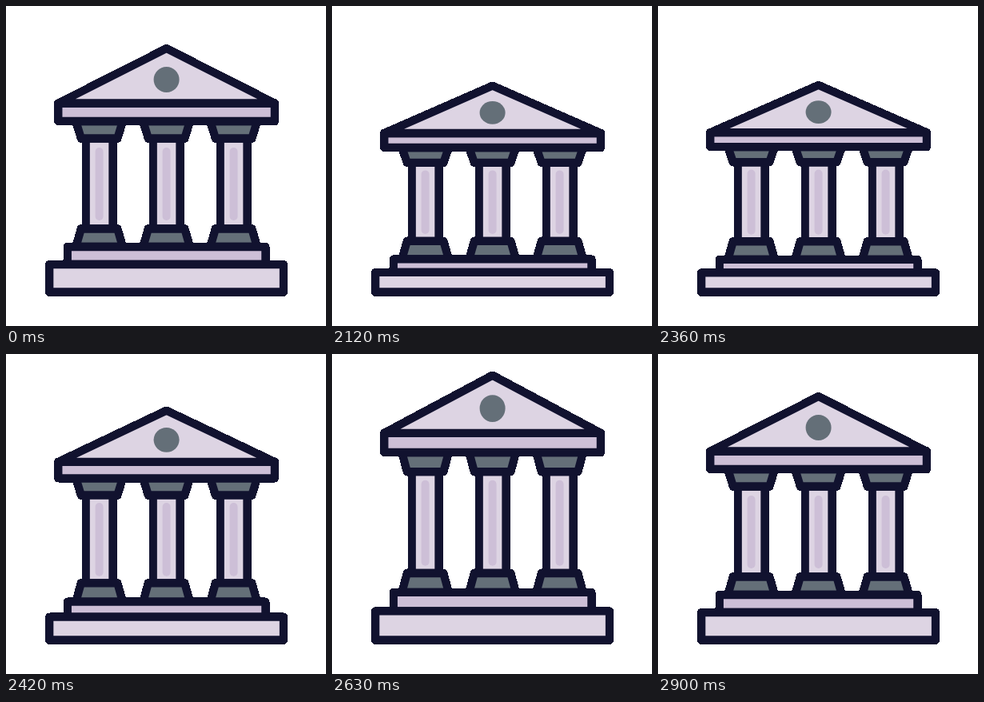
An HTML page with a canvas that plays this animation: 400x400 px, repeating every 2.93 s.

```html
<!DOCTYPE html>
<html>
<head>
<meta charset="utf-8">
<title>Bouncing bank</title>
<style>
html, body { margin: 0; height: 100%; overflow: hidden; background: #fff; }
canvas { display: block; }
</style>
</head>
<body>
<canvas id="stage" width="400" height="400"></canvas>
<script>
const ctx = document.getElementById('stage').getContext('2d', { willReadFrequently: true });
const INK = '#11122f', LIGHT = '#ddd4e3', MAUVE = '#cdbfd7', GRAY = '#646f78';
const LOOP = 2930, STEP = 30, SIZE = 400, MID = 200.6, FLOOR = 357.5;

// Heights of: apex, entablature top and bottom, capital bottom, base top,
// step top, plinth top, medallion centre and radius, groove start and end
const REST    = [53, 121.5, 144, 165.5, 278.5, 301, 323, 92, 16, 182, 263];
const SQUASH  = [110.5, 167.7, 184.7, 203, 297.5, 320, 335.2, 143, 14, 217, 284];
const STRETCH = [24.3, 96.8, 121.2, 145.5, 273.6, 297.6, 321.2, 66, 17, 161, 259.5];

const easeOut = u => 1 - (1 - u) ** 3;
const easeInOut = p => u => u < .5 ? (2 * u) ** p / 2 : 1 - (2 - 2 * u) ** p / 2;

const MOVES = [
  { start: 2001, end: 2280, from: REST, to: SQUASH, ease: easeOut },
  { start: 2280, end: 2570, from: SQUASH, to: STRETCH, ease: easeInOut(2.2) },
  { start: 2570, end: 2870, from: STRETCH, to: REST, ease: easeInOut(2) }
];

function poseAt(t) {
  const move = MOVES.find(m => t >= m.start && t < m.end);
  if (!move) return REST;
  const k = move.ease((t - move.start) / (move.end - move.start));
  return move.from.map((v, i) => v + (move.to[i] - v) * k);
}

function shape(fill, ...points) {
  ctx.beginPath();
  points.forEach(([x, y]) => ctx.lineTo(x, y));
  ctx.closePath();
  ctx.fillStyle = fill;
  ctx.fill();
  ctx.lineWidth = 10.3;
  ctx.strokeStyle = INK;
  ctx.stroke();
}

// Symmetric block given by its half widths at the top and bottom
function block(fill, x, topHalf, top, bottomHalf, bottom) {
  shape(fill, [x - topHalf, top], [x + topHalf, top],
    [x + bottomHalf, bottom], [x - bottomHalf, bottom]);
}

function column(x, capTop, capBottom, baseTop, baseBottom, grooveTop, grooveBottom) {
  block(LIGHT, x, 16.9, capBottom, 16.9, baseTop);
  ctx.beginPath();
  ctx.moveTo(x, grooveTop);
  ctx.lineTo(x, grooveBottom);
  ctx.lineWidth = 10;
  ctx.strokeStyle = MAUVE;
  ctx.stroke();
  block(GRAY, x, 29.3, capTop, 22.8, capBottom);
  block(GRAY, x, 22.8, baseTop, 29.3, baseBottom);
}

// Hard silhouette: every pixel is either opaque or clear
function hardenEdges() {
  const image = ctx.getImageData(0, 0, SIZE, SIZE), d = image.data;
  for (let i = 3; i < d.length; i += 4) d[i] = d[i] < 128 ? 0 : 255;
  ctx.putImageData(image, 0, 0);
}

function draw(pose) {
  const [apex, entTop, entBottom, capBottom, baseTop, stepTop, plinthTop,
    discY, discR, grooveTop, grooveBottom] = pose;
  ctx.clearRect(0, 0, SIZE, SIZE);
  ctx.lineJoin = ctx.lineCap = 'round';

  for (const dx of [-84, 0, 84])
    column(MID + dx, entBottom, capBottom, baseTop, stepTop, grooveTop, grooveBottom);
  block(MAUVE, MID, 123.8, stepTop, 123.8, plinthTop);
  block(LIGHT, MID, 146.4, plinthTop, 146.4, FLOOR);
  block(MAUVE, MID, 135.3, entTop, 135.3, entBottom);
  shape(LIGHT, [MID, apex], [MID + 135.3, entTop], [MID - 135.3, entTop]);

  ctx.beginPath();
  ctx.ellipse(MID, discY, 16, discR, 0, 0, 2 * Math.PI);
  ctx.fillStyle = GRAY;
  ctx.fill();
  hardenEdges();
}

const began = performance.now();
function tick() {
  const t = (performance.now() - began) % LOOP;
  // Motion advances in 30 ms steps after the long hold
  draw(t < 2030 ? REST : poseAt(2030 + Math.floor((t - 2030) / STEP) * STEP));
  requestAnimationFrame(tick);
}
tick();
</script>
</body>
</html>
```
